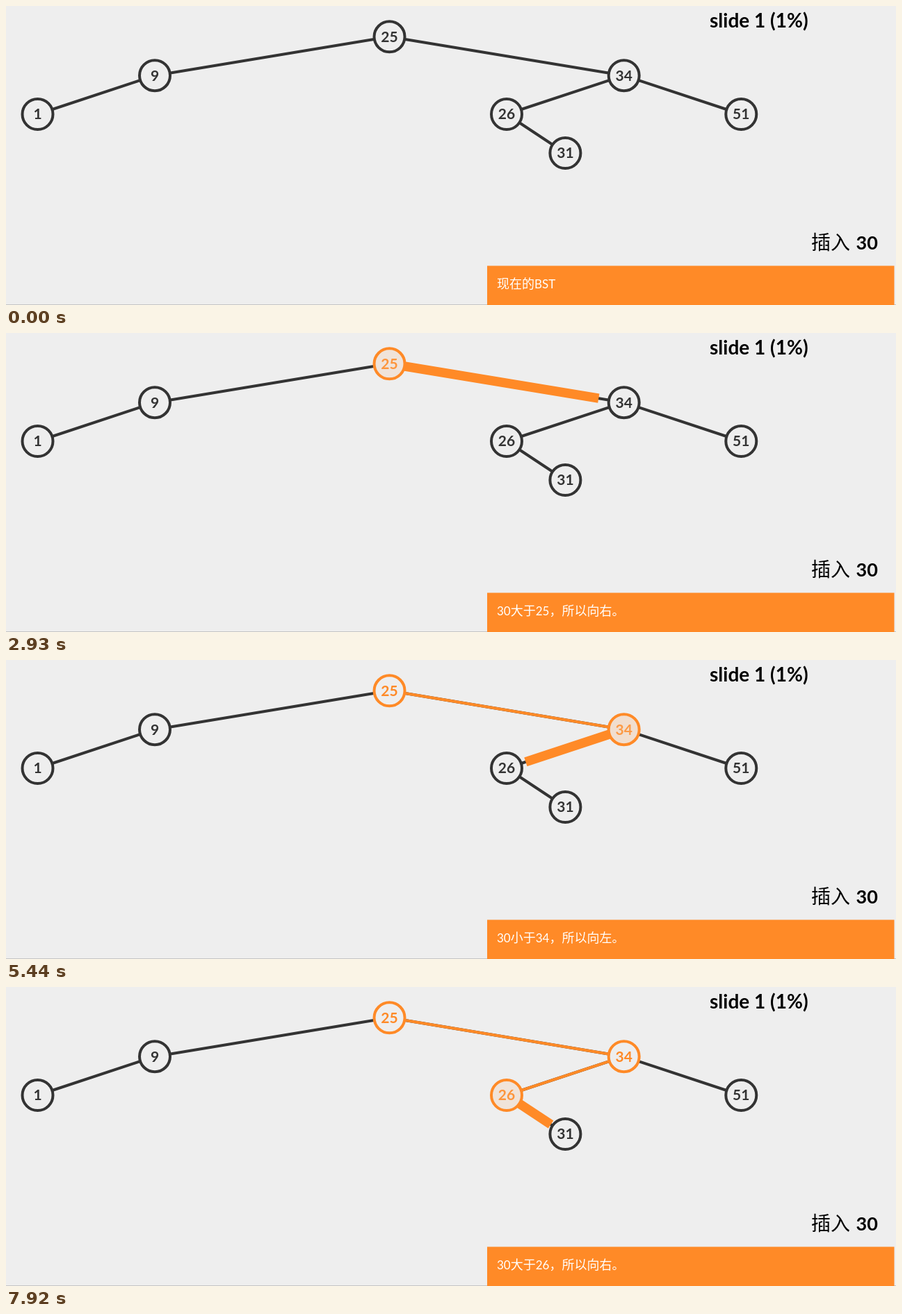
Write an HTML page with a canvas that moves like this. It is 1280 by 431 pixels and loops after 7.99 s.

```html
<!DOCTYPE html>
<html lang="zh-CN">
<head>
<meta charset="utf-8">
<title>BST</title>
<style>
  html, body { margin: 0; width: 100%; height: 100%; overflow: hidden; background: #eee; }
  canvas { display: block; }
</style>
</head>
<body>
<canvas id="stage" width="1280" height="431"></canvas>
<script>
const ctx = document.getElementById('stage').getContext('2d');
const LOOP = 7990, FILL_TIME = 1130, EDGE_TIME = 1010, THIN_TIME = 170;
const THIN = 4, THICK = 13.5;
const BACK = [238, 238, 238], DARK = [51, 51, 51], ORANGE = [255, 138, 39];

const nodes = {
  25: [551.5, 44.3], 9: [214, 100.2], 34: [888.7, 100.2], 1: [45.5, 156],
  26: [720, 156], 51: [1057.3, 156], 31: [804.4, 212]
};
const edges = [[25, 9], [25, 34], [9, 1], [34, 26], [34, 51], [26, 31]];

// Each visit: the node fills, then empties while the edge to the next node grows.
const visits = [
  { node: 25, next: 34, fill: 880, empty: 2030, grow: 2030 },
  { node: 34, next: 26, fill: 3375, empty: 4590, grow: 4595 },
  { node: 26, next: 31, fill: 5915, empty: 7020, grow: 7160 }
];

const captions = [
  [0, '现在的BST'],
  [880, '将30与25进行比较'],
  [2030, '30大于25，所以向右。'],
  [3350, '将30与34进行比较'],
  [4590, '30小于34，所以向左。'],
  [5850, '将30与26进行比较'],
  [7020, '30大于26，所以向右。']
];

const progress = (t, start, length) => Math.min(1, Math.max(0, (t - start) / length));
const ease = p => p < .5 ? 4 * p ** 3 : 1 - 4 * (1 - p) ** 3;
const lerp = (a, b, p) => a + (b - a) * p;
const mix = (a, b, p) => a.map((v, i) => lerp(v, b[i], p));
const css = c => `rgb(${c.map(Math.round)})`;

function line([x1, y1], [x2, y2], width, color) {
  ctx.beginPath();
  ctx.moveTo(x1, y1);
  ctx.lineTo(x2, y2);
  ctx.lineWidth = width;
  ctx.strokeStyle = css(color);
  ctx.stroke();
}

// Latin and Chinese runs use their own font and size.
function write(text, x, y, color, latin, cjkSize) {
  ctx.fillStyle = color;
  ctx.textAlign = 'left';
  for (const run of text.match(/[ -~]+|[^ -~]+/g)) {
    ctx.font = run[0] <= '~'
      ? `${latin} Lato, sans-serif`
      : `300 ${cjkSize}px "Noto Sans CJK SC", "Noto Sans CJK", sans-serif`;
    ctx.fillText(run, x, y);
    x += ctx.measureText(run).width;
  }
}

function drawNode(name, t) {
  const [x, y] = nodes[name];
  const visit = visits.find(v => v.node == name);
  let ring = DARK, fill = BACK, label = DARK;
  if (visit) {
    const on = ease(progress(t, visit.fill, FILL_TIME));
    const off = progress(t, visit.empty, EDGE_TIME);
    ring = mix(DARK, ORANGE, on);
    fill = mix(mix(BACK, ORANGE, on), BACK, off);
    label = mix(mix(DARK, BACK, on), ORANGE, off);
  }
  ctx.beginPath();
  ctx.arc(x, y, 22, 0, 2 * Math.PI);
  ctx.fillStyle = css(fill);
  ctx.fill();
  ctx.lineWidth = 4;
  ctx.strokeStyle = css(ring);
  ctx.stroke();
  ctx.font = '700 21px Lato, sans-serif';
  ctx.textAlign = 'center';
  ctx.fillStyle = css(label);
  ctx.fillText(name, x, y + 7.4);
}

function drawTrail(visit, t) {
  const grown = progress(t, visit.grow, EDGE_TIME);
  if (!grown) return;
  const thinned = progress(t, visit.grow + EDGE_TIME, THIN_TIME);
  const from = nodes[visit.node];
  line(from, mix(from, nodes[visit.next], grown), lerp(THICK, THIN, thinned), ORANGE);
}

function draw(t) {
  ctx.fillStyle = css(BACK);
  ctx.fillRect(0, 0, 1280, 431);
  ctx.fillStyle = '#c4c4c4';
  ctx.fillRect(0, 430, 1280, 1);
  ctx.fillStyle = css(ORANGE);
  ctx.fillRect(692, 374.5, 585.5, 56.5);

  for (const [a, b] of edges) line(nodes[a], nodes[b], THIN, DARK);
  for (const visit of visits) drawTrail(visit, t);
  for (const name in nodes) drawNode(name, t);

  write('slide 1 (1%)', 1012, 31, '#000', '700 28px', 28);
  write('插入', 1158, 351, '#000', '700 27px', 28);
  write('30', 1222.5, 351, '#000', '700 27px', 28);
  const caption = captions.filter(([start]) => t >= start).pop()[1];
  write(caption, 706, 407, '#fff', '400 17px', 18);
}

const begin = performance.now();
function tick() {
  draw((performance.now() - begin) % LOOP);
  requestAnimationFrame(tick);
}
tick();
</script>
</body>
</html>
```
